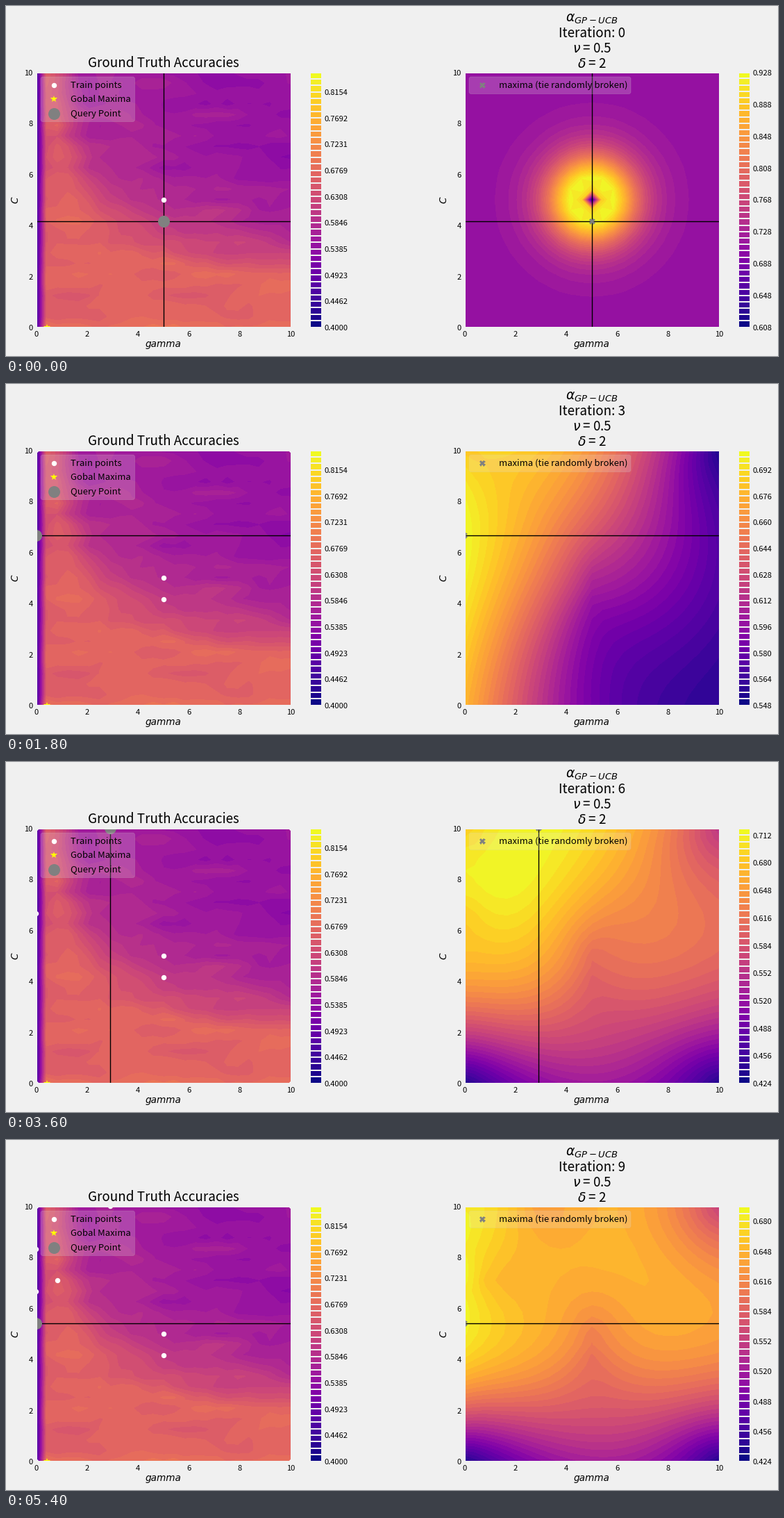
Animation of 1112 by 504 pixels, one loop 6 s. Source, as a matplotlib script:

```python
import matplotlib.pyplot as plt
import numpy as np
from matplotlib.animation import FuncAnimation
from matplotlib.patches import FancyBboxPatch

W, H, DPI = 1112, 504, 100
PX = 72 / DPI                       # points per pixel
BG, GRAY = "#f0f0f0", "#808080"
SIDE, TOP = 367.3, 95.3
LEFT_X, RIGHT_X = 43.2, 660.2
BAR_OFFSET, BAR_WIDTH = 393.3, 18.4
SANS = ["Noto Sans CJK JP", "DejaVu Sans"]

plt.rcParams.update({
    "font.family": SANS,
    "mathtext.fontset": "dejavusans",
    "axes.edgecolor": BG,
    "axes.linewidth": 3 * PX,
})

N = 25
STEP = 10 / (N - 1)
GRID = np.linspace(0, 10, N)
GX, GY = np.meshgrid(GRID, GRID)
CELLS = np.column_stack([GX.ravel(), GY.ravel()])

# Visited grid nodes in order; the last one is only queried.
POINTS = STEP * np.array([(12, 12), (12, 10), (24, 24), (0, 24), (0, 16), (0, 0),
                          (24, 0), (7, 24), (0, 20), (2, 17), (0, 13)])
NO_GAMMA, NO_C = .686, .428         # accuracy when a parameter is zero
SCORES = np.array([.609, .598, .55, NO_GAMMA, NO_GAMMA, NO_C,
                   NO_C, .63, NO_GAMMA, .66])


def matern(a, b, scale):
    dist = np.linalg.norm(a[:, None] - b[None], axis=2)
    s = np.sqrt(3) * dist / scale
    return (1 + s) * np.exp(-s)


def covariance(pts, scale):
    return matern(pts, pts, scale) + 1e-10 * np.eye(len(pts))


def log_likelihood(pts, y, scale):
    cov = covariance(pts, scale)
    return -0.5 * y @ np.linalg.solve(cov, y) - 0.5 * np.linalg.slogdet(cov)[1]


def acquisition(i):
    """Upper confidence bound after i + 1 samples."""
    pts, y = POINTS[:i + 1], SCORES[:i + 1]
    scales = np.geomspace(1, 2000, 300)
    scale = scales[np.argmax([log_likelihood(pts, y, s) for s in scales])]
    cross = matern(CELLS, pts, scale)
    weights = np.linalg.solve(covariance(pts, scale), cross.T).T
    var = np.clip(1 - np.sum(weights * cross, axis=1), 0, None)
    beta = np.sqrt(1.5 * np.log(i + 1) + np.log(np.pi ** 2 / 6))
    return (weights @ y + beta * np.sqrt(var)).reshape(GX.shape)


def ground_truth():
    """Accuracy falls off across a hyperbola, with streaks along gamma."""
    ratio = np.clip(GX * (GY - 1.53) / 7.75, 0, None)
    z = .535 + .13 / (1 + (ratio / 1.9) ** 2)
    z += .02 * np.exp(-((ratio - .6) / .3) ** 2)
    z -= .07 * np.exp(-((ratio - 2) / .7) ** 2 - (GX / 2.5) ** 2)
    z += .02 * np.exp(-GY / .25) - .004 * GY * np.exp(-GX)
    noise = np.random.default_rng(4).normal(0, .018, z.shape)
    z += sum(np.roll(noise, k, axis=1) for k in range(-2, 3)) / 5
    z[:, 0] = .425
    return z


TRUTH = ground_truth()
SURFACES = [acquisition(i) for i in range(len(SCORES))]

fig = plt.figure(figsize=(W / DPI, H / DPI), dpi=DPI, facecolor=BG)


def pixel_axes(x, y, w, h):
    ax = fig.add_axes([x / W, 1 - (y + h) / H, w / W, h / H])
    ax.set(xticks=[], yticks=[])
    return ax


def write(page, x, y, text, size=11.1, ha="center", **kw):
    page.text(x, y, text, fontsize=size * PX, ha=ha, va="baseline", **kw)


def dot(ax, x, y, marker, color, size):
    ax.plot(x, y, linestyle="none", marker=marker, color=color,
            markersize=size * PX, markeredgewidth=0)


def decimals_for(values):
    exact = (d for d in (2, 3) if np.allclose(values, np.round(values, d), 0, 1e-9))
    return next(exact, 4)


def color_bar(page, x, levels):
    ax = pixel_axes(x, TOP, BAR_WIDTH, SIDE)
    n = len(levels) - 1
    ax.bar(0, 1, bottom=np.arange(n), width=1, linewidth=2 * PX, edgecolor=BG,
           color=plt.cm.plasma(np.linspace(0, 1, n)))
    ax.set(xlim=(-.5, .5), ylim=(0, n))
    stride = int(np.ceil((n + 1) / 10))
    ticks = levels[::stride]
    places = decimals_for(ticks)
    for k, value in enumerate(ticks):
        write(page, x + BAR_WIDTH + 4, TOP + SIDE * (1 - k * stride / n) + 4.5,
              f"{value:.{places}f}", ha="left")


def panel(page, x, z, levels, query):
    ax = pixel_axes(x, TOP, SIDE, SIDE)
    contours = ax.contourf(GX, GY, z, levels, cmap="plasma")
    ax.axvline(query[0], color="black", linewidth=1)
    ax.axhline(query[1], color="black", linewidth=1)
    ax.set(xlim=(0, 10), ylim=(0, 10), xticks=[], yticks=[])
    for v in range(0, 11, 2):
        shift = SIDE * v / 10
        write(page, x + shift, 476, str(v))
        write(page, x - 4.5, TOP + SIDE - shift + 4.5, str(v), ha="right")
    italic = dict(family="DejaVu Sans", style="oblique")
    write(page, x + SIDE / 2, 491.5, "gamma", 13.6, **italic)
    page.text(x - 29.5, TOP + SIDE / 2, "C", fontsize=13.6 * PX, rotation=90,
              ha="center", va="center", **italic)
    color_bar(page, x + BAR_OFFSET, contours.levels)
    return ax


def legend(page, x, width, height, text_x, entries):
    page.add_patch(FancyBboxPatch(
        (x + 3, 105), width - 6, height - 6, boxstyle="round,pad=3,rounding_size=3",
        facecolor=BG, edgecolor="#cccccc", linewidth=PX, alpha=.2))
    for k, (text, *style) in enumerate(entries):
        y = 113.8 + 20.2 * k
        dot(page, x + 18.7, y + .4, *style)
        write(page, text_x, y + 4.4, text, 13.1, ha="left")


TRAIN = ("o", "white", 7.4)
BEST = ("*", "yellow", 11)
QUERY = ("o", GRAY, 17)
MAXIMA = ("X", GRAY, 9)


def update(i):
    fig.clear()
    page = pixel_axes(0, 0, W, H)
    page.set(xlim=(0, W), ylim=(H, 0), zorder=5)
    page.axis("off")
    query = POINTS[i + 1]

    left = panel(page, LEFT_X, TRUTH, np.linspace(.4, .85, 40), query)
    dot(left, *POINTS[:i + 1].T, *TRAIN)
    dot(left, STEP, 0, *BEST)
    dot(left, *query, *QUERY)
    write(page, LEFT_X + SIDE / 2, 88.5, "Ground Truth Accuracies", 18.8)
    legend(page, 50, 135.5, 64.5, 93, [("Train points", *TRAIN),
                                       ("Gobal Maxima", *BEST),
                                       ("Query Point", *QUERY)])

    right = panel(page, RIGHT_X, SURFACES[i], 40, query)
    dot(right, *query, *MAXIMA)
    title = [r"$\alpha_{GP-UCB}$", f"Iteration: {i}", r"$\nu$ = 0.5", r"$\delta$ = 2"]
    for k, line in enumerate(title):
        write(page, RIGHT_X + SIDE / 2, 23 + 21.9 * k, line, 18.8)
    legend(page, 667, 233, 24.5, 710, [("maxima (tie randomly broken)", *MAXIMA)])


animation = FuncAnimation(fig, update, frames=len(SCORES), interval=600, repeat=True,
                          repeat_delay=0, blit=False)
plt.show()
```
